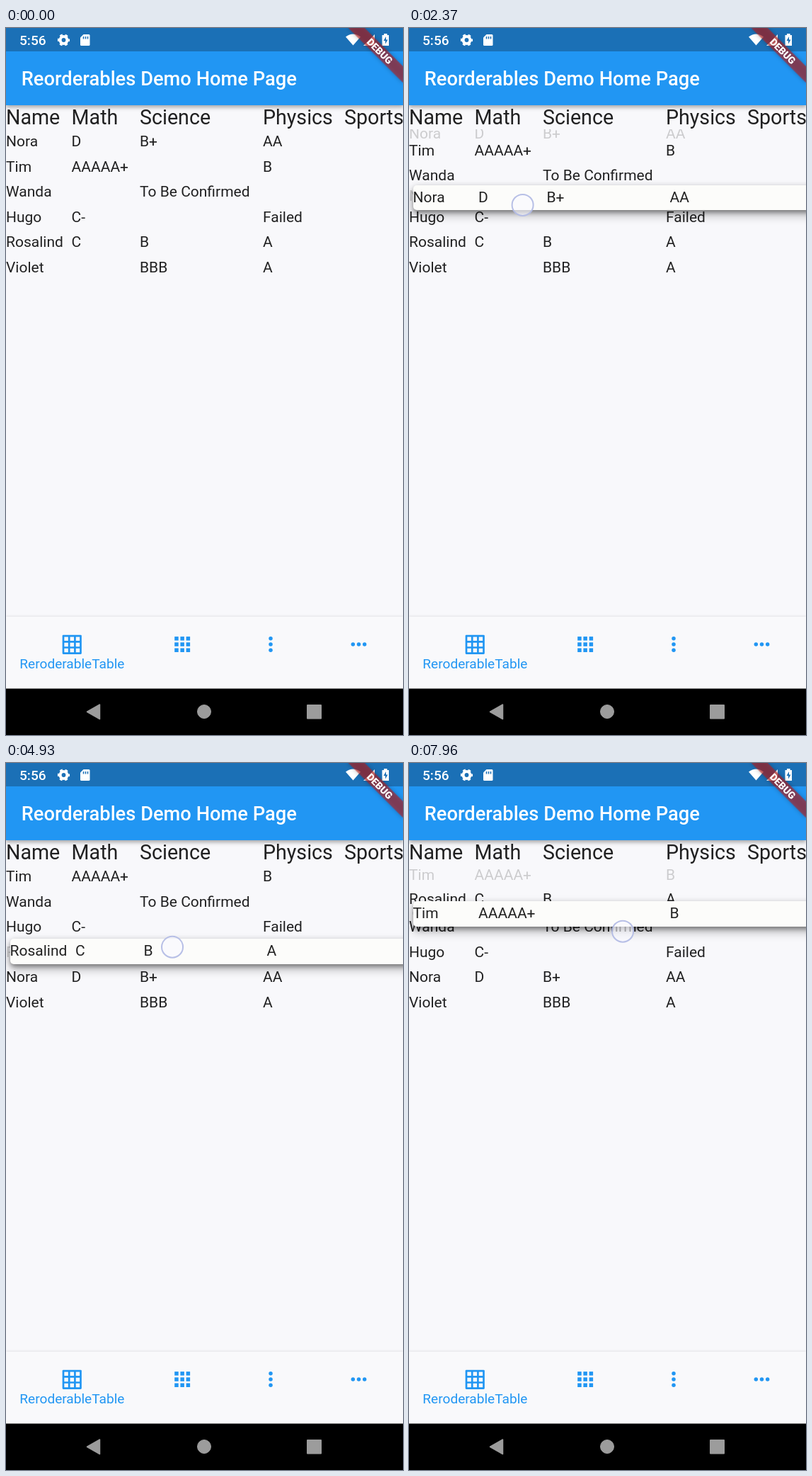
Animation, 561 px wide and 998 px high, one loop 8 s. Source, as an HTML page:

```html
<!DOCTYPE html>
<html lang="en">
<head>
<meta charset="utf-8">
<title>Reorderable table</title>
<style>
html, body { margin: 0; width: 100%; height: 100%; overflow: hidden; }
body { background: #f8f8fb; font-family: Roboto, sans-serif; color: rgba(0,0,0,.87); }
#stage { position: absolute; left: 0; top: 0; width: 561px; height: 998px; overflow: hidden; }
#stage > * { position: absolute; }
.row { left: 0; width: 561px; overflow: hidden; font-size: 21px; line-height: 35.46px; }
.row > div { position: absolute; left: 0; width: 100%; height: 35.46px; }
.row span, #head span { position: absolute; top: 0; white-space: nowrap; }
#head { left: 0; top: 109.2px; width: 561px; height: 34.1px; font-size: 28.64px; line-height: 34.1px; }
.lifted { left: 5.5px; width: 700px; height: 35.46px; overflow: visible; background: #fcfcfa; border-radius: 5px;
  box-shadow: 0 4px 6px -1px rgba(0,0,0,.32), 0 8px 13px rgba(0,0,0,.24), 0 1px 10px rgba(0,0,0,.14); }
#bar { left: 0; top: 0; width: 561px; height: 109px; background: #2196f3;
  box-shadow: 0 3px 5px rgba(0,0,0,.24), 0 1px 9px rgba(0,0,0,.16); }
#nav { left: 0; top: 831px; width: 561px; height: 102px; background: #f9f9fb; box-shadow: 0 -1px 3px rgba(0,0,0,.09); }
#touch { left: -16px; top: -16px; width: 28px; height: 28px; border: 2px solid rgba(172,182,226,.85);
  border-radius: 50%; background: rgba(248,248,255,.6); }
svg { left: 0; top: 0; }
</style>
</head>
<body>
<div id="stage">
  <div id="head"></div>
  <div id="bar"></div>
  <div id="nav"></div>
  <svg width="561" height="998" font-family="Roboto, sans-serif">
    <rect width="561" height="33" fill="#1b70b6"/>
    <g fill="#fff">
      <text x="19" y="24" font-size="19.1" font-weight="500">5:56</text>
      <g fill="none" stroke="#fff">
        <circle cx="81.5" cy="17" r="4.9" stroke-width="4"/>
        <circle cx="81.5" cy="17" r="7.2" stroke-width="2.8" stroke-dasharray="3.8 3.74" stroke-dashoffset="1.9"/>
      </g>
      <path d="M109.5 9h7.5q1.5 0 1.5 1.5v13q0 1.5-1.5 1.5h-10.500q-1.500 0-1.500-1.500V13.500z"/>
      <path d="M109.500 12v3.500m3-3.500v3.500m3-3.500v3.500" stroke="#1b70b6" stroke-width="1.500"/>
      <path d="M490.500 24.500L480 12.500Q490.500 4.500 501 12.500z"/>
      <path d="M521 9v16h-16z"/>
      <path d="M534 8h4.500v2h2.500v15h-9.500v-15h2.500z"/>
      <path d="M537 12l-3.500 6h2.500v4.500l3.500-6h-2.500z" fill="#1b70b6"/>
      <text x="21.8" y="80.500" font-size="27.28" font-weight="500">Reorderables Demo Home Page</text>
    </g>
    <g transform="translate(561 0) rotate(45)">
      <rect x="-54.6" y="38.2" width="109.1" height="16.4" fill="rgba(183,28,28,.63)"
        style="filter:drop-shadow(0 0 3px rgba(0,0,0,.4))"/>
      <text x="0" y="51.300" font-size="13.9" font-weight="900" fill="#fff" text-anchor="middle">DEBUG</text>
    </g>
    <g fill="#2196f3">
      <path d="M81 858.100h24.500v24.500h-24.500zM89.200 858v25m8.200-25v25M81 866.300h25m-25 8.200h25"
        fill="none" stroke="#2196f3" stroke-width="2.700" stroke-linejoin="round"/>
      <text x="93.400" y="904" font-size="19.1" text-anchor="middle">ReroderableTable</text>
      <g id="icons"></g>
    </g>
    <rect y="932.500" width="561" height="66" fill="#000"/>
    <g fill="#9c9c9c" stroke="#9c9c9c" stroke-linejoin="round">
      <path d="M132.500 955v20.500l-18-10.250z" stroke-width="1.500"/>
      <circle cx="280" cy="965" r="9.500"/>
      <rect x="426" y="956" width="19" height="18.500" stroke-width="2"/>
    </g>
  </svg>
  <div id="touch"></div>
</div>
<script>
const LOOP = 8000, TOP = 143.3, H = 35.46, LAG = 40;
const COLUMNS = [0, 92.6, 189, 363, 478];
const HEADINGS = ['Name', 'Math', 'Science', 'Physics', 'Sports'];
const PEOPLE = [
  ['Nora', 'D', 'B+', 'AA'],
  ['Tim', 'AAAAA+', '', 'B'],
  ['Wanda', '', 'To Be Confirmed', ''],
  ['Hugo', 'C-', '', 'Failed'],
  ['Rosalind', 'C', 'B', 'A'],
  ['Violet', '', 'BBB', 'A']
];

// path: [time, x, y] of the finger; moves: [start, end, from gap, to gap]
const DRAGS = [
  { who: 0, order: [0, 1, 2, 3, 4, 5], touch: 1320, lift: 1690, drop: 2860, fade: 2890, gone: 3070, grip: 6,
    path: [[2180, 138, 159], [2220, 142, 178], [2280, 150, 212], [2400, 164, 262], [2500, 171, 283],
      [2570, 174, 291], [2610, 175, 294], [2780, 177, 297.5]],
    moves: [[2240, 2440, 0, 2], [2440, 2640, 2, 3], [2640, 2840, 3, 4]] },
  { who: 4, order: [1, 2, 3, 4, 0, 5], touch: 4560, lift: 4850, drop: 5660, fade: 5700, gone: 5960, grip: 0,
    pause: [5390, 5590],
    path: [[4850, 234, 272], [4890, 234.3, 266], [4930, 235, 260], [5020, 239, 235], [5150, 244, 208],
      [5270, 247, 194], [5340, 248, 191]],
    moves: [[4990, 5190, 3, 2], [5210, 5410, 2, 1]] },
  { who: 1, order: [1, 4, 2, 3, 0, 5], touch: 7460, lift: 7840, drop: 9000, fade: 9000, gone: 9000, grip: 6.5,
    path: [[7840, 294.5, 158.5], [7880, 297, 176], [7920, 299.5, 205.5], [7960, 302, 237], [8000, 304, 262]],
    moves: [[7940, 8140, 0, 1]] }
];

const stage = document.getElementById('stage'), touch = document.getElementById('touch');
const bar = document.getElementById('bar');
const clamp = v => Math.min(1, Math.max(0, v));
const cells = texts => texts.map((s, i) => `<span style="left:${COLUMNS[i]}px">${s}</span>`).join('');

function addRow(texts, kind, before) {
  const el = document.createElement('div');
  el.className = 'row ' + kind;
  el.innerHTML = `<div>${cells(texts)}</div>`;
  return stage.insertBefore(el, before);
}

document.getElementById('head').innerHTML = cells(HEADINGS);
const rows = PEOPLE.map(p => addRow(p, '', bar));
const ghosts = PEOPLE.map(p => addRow(p, '', bar));
const lifted = PEOPLE.map(p => addRow(p, 'lifted', touch));

let icons = '';
for (const i of [-1, 0, 1]) {
  const d = i * 8.2;
  for (const j of [-1, 0, 1])
    icons += `<rect x="${246.4 + d}" y="${867.3 + j * 8.2}" width="5.5" height="5.5"/>`;
  icons += `<circle cx="374" cy="${870 + d}" r="2.75"/><circle cx="${498.5 + d}" cy="870" r="2.75"/>`;
}
document.getElementById('icons').innerHTML = icons;

function finger(path, t) {
  if (t <= path[0][0]) return path[0].slice(1);
  const i = path.findIndex(p => p[0] > t);
  if (i < 0) return path[path.length - 1].slice(1);
  const [a, b] = [path[i - 1], path[i]], k = (t - a[0]) / (b[0] - a[0]);
  return [a[1] + (b[1] - a[1]) * k, a[2] + (b[2] - a[2]) * k];
}

function place(el, y, height, opacity = 1) {
  el.style.display = height > 0.2 ? '' : 'none';
  el.style.top = y + 'px';
  el.style.height = height + 'px';
  el.style.opacity = opacity;
  el.firstChild.style.top = (height - H) / 2 + 'px';
}

function reorder(order, who, gap) {
  const list = order.filter(p => p !== who);
  list.splice(gap, 0, who);
  return list;
}

function layoutDrag(d, t) {
  const now = d.pause && t > d.pause[0] ? Math.max(d.pause[0], t - d.pause[1] + d.pause[0]) : t;
  const home = d.order.indexOf(d.who);
  let from = home, to = home, p = 1;
  for (const [start, end, a, b] of d.moves)
    if (now >= start) [from, to, p] = [a, b, clamp((now - start) / (end - start))];
  let y = TOP;
  const others = d.order.filter(x => x !== d.who);
  for (let gap = 0; gap <= others.length; gap++) {
    if (gap === to) { place(rows[d.who], y, H * p, .2); y += H * p; }
    else if (gap === from) { place(ghosts[d.who], y, H * (1 - p), .2); y += H * (1 - p); }
    if (gap < others.length) { place(rows[others[gap]], y, H); y += H; }
  }
  const [, fy] = finger(d.path, t - LAG);
  place(lifted[d.who], fy + d.grip - H / 2, H);
}

function draw(t) {
  for (const el of [...ghosts, ...lifted]) el.style.display = 'none';
  touch.style.opacity = 0;
  let order = DRAGS[0].order;
  for (const d of DRAGS)
    if (t >= d.drop) order = reorder(d.order, d.who, d.moves[d.moves.length - 1][3]);
  const active = DRAGS.find(d => t >= d.lift && t < d.drop);
  if (active) layoutDrag(active, t);
  else order.forEach((p, i) => place(rows[p], TOP + i * H, H));

  const held = DRAGS.find(d => t >= d.touch && t < d.gone);
  if (held) {
    const [x, y] = finger(held.path, t);
    touch.style.transform = `translate(${x}px, ${y}px)`;
    touch.style.opacity = 1 - clamp((t - held.fade) / (held.gone - held.fade));
  }
}

const begin = performance.now();
function tick() {
  draw((performance.now() - begin) % LOOP);
  requestAnimationFrame(tick);
}
tick();
</script>
</body>
</html>
```
